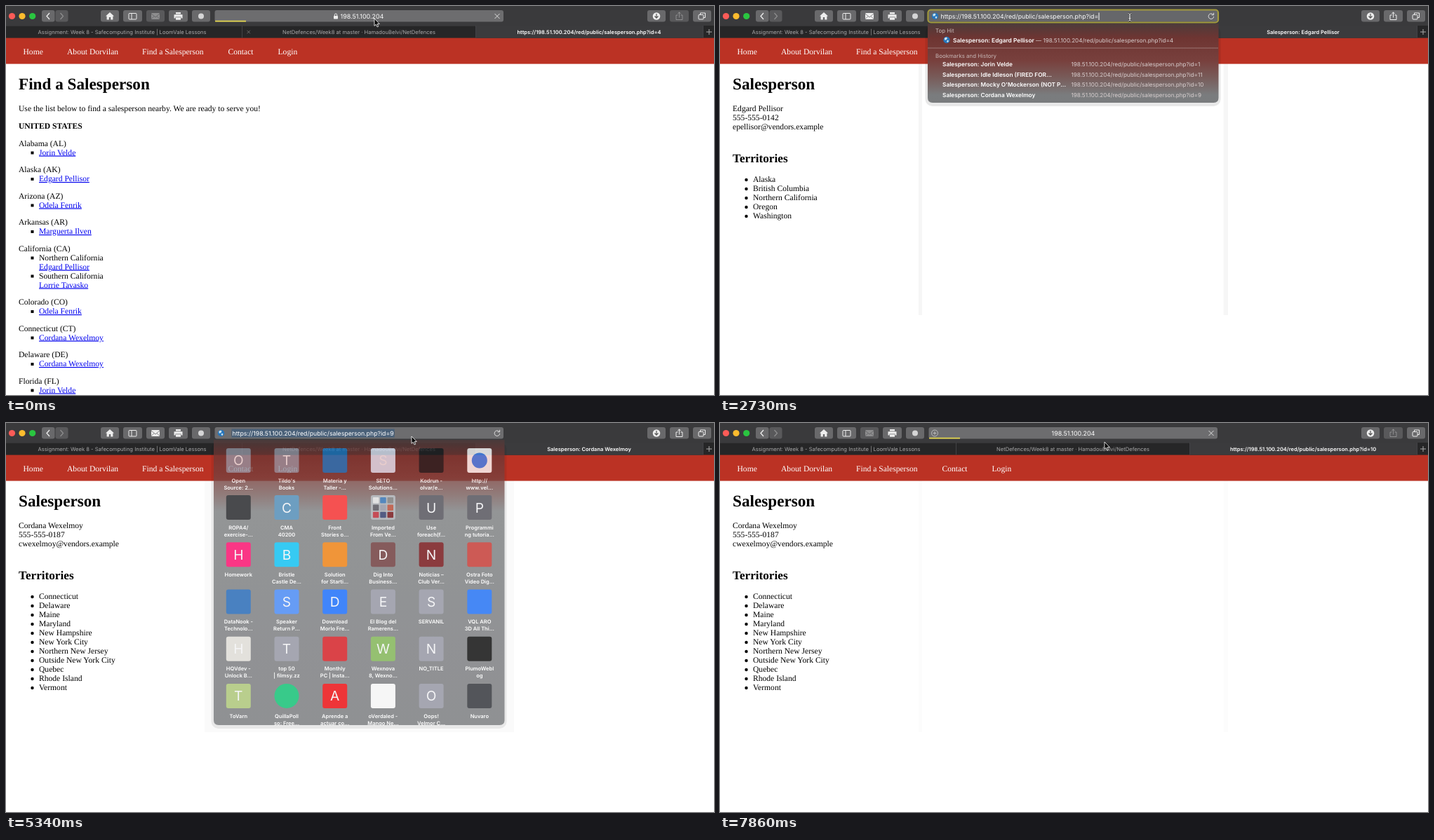
Animation of 1009x555 px, one loop 8 s. Source, as an HTML page:

```html
<!DOCTYPE html>
<html lang="en">
<head>
<meta charset="utf-8">
<title>Salesperson</title>
<style>
  html, body { margin: 0; width: 100%; height: 100%; overflow: hidden; background: #fff; }
  svg { display: block; width: 100vw; height: 100vh; text-rendering: geometricPrecision; font-family: Inter, sans-serif; }
  .serif { font-family: "Liberation Serif", serif; font-size: 11.6px; }
  text { white-space: pre; }
</style>
</head>
<body>
<svg id="stage" viewBox="0 0 1009 555"></svg>
<script>
const LOOP = 8000;
const HOST = '198.51.100.204';
const URL_SIZE = 8.75;
const stage = document.getElementById('stage');

const people = [
  { name: 'Edgard Pellisor', phone: '555-555-0142', mail: 'epellisor@vendors.example',
    areas: 'Alaska|British Columbia|Northern California|Oregon|Washington' },
  { name: 'Cordana Wexelmoy', phone: '555-555-0187', mail: 'cwexelmoy@vendors.example',
    areas: 'Connecticut|Delaware|Maine|Maryland|New Hampshire|New York City|Northern New Jersey|' +
      'Outside New York City|Quebec|Rhode Island|Vermont' }
];

// "*" marks a bullet, "_" a link
const directory = `Alabama (AL)|*_Jorin Velde
Alaska (AK)|*_Edgard Pellisor
Arizona (AZ)|*_Odela Fenrik
Arkansas (AR)|*_Marguerta Ilven
California (CA)|*Northern California|_Edgard Pellisor|*Southern California|_Lorrie Tavasko
Colorado (CO)|*_Odela Fenrik
Connecticut (CT)|*_Cordana Wexelmoy
Delaware (DE)|*_Cordana Wexelmoy
Florida (FL)|*_Jorin Velde`.split('\n');

// letter, colour, two label lines; "o" is a dot on the tile, "@" a round tile, "#" a folder
const tiles = `O,#9092a0,Open,Source: 2...
T,#9092a0,Tildo's,Books
,#1b76bf,Materia y,Taller -...
S,#dae4f5,SETO,Solutions...
,#1d1f22,Kodrun -,olvar/e...
o,#ffffff,http://,www.vel...
,#1d1f22,ROPA4/,exercise-...
C,#4a88b4,CMA,40200
,#f52828,Front,Stories o...
#,#a6a9af,Imported,From Ve...
U,#4d4c55,Use,foreach(f...
P,#4d4c55,Programmi,ng tutoria...
H,#fb0668,Homework,
B,#06bff2,Bristle,Castle De...
,#ee7d0a,Solution,for Starti...
D,#693435,Dig Into,Business...
N,#700c10,Noticias –,Club Ver...
,#c2332c,Ostra Foto,Video Dig...
,#1d64b4,DataNook -,Technolo...
S,#4285f4,Speaker,Return P...
D,#1268fb,Download,Morlo Fre...
E,#9092a0,El Blog del,Ramerens...
S,#9092a0,SERVANIL,
,#1a6cf5,VQL ARO,3D All Thi...
H,#dedcd5,HQVdev -,Unlock B...
T,#9092a0,top 50,| filmsy.zz
,#d3161c,Monthly,PC | Insta...
W,#7cb250,Wexnova,8&#44; Wexno...
N,#9092a0,NO_TITLE,
,#050505,PlumoWebl,og
T,#a9c473,ToVarn,
@,#08bf6f,QuillaPoll,so: Free...
A,#ec0408,Aprende a,actuar co...
,#f6f6f6,oVerdaled -,Mango Ne...
O,#9092a0,Oops!,Velmor C...
,#2a2d33,Nuvaro,`.split('\n').map(row => row.split(','));

const visited = {
  1: 'Jorin Velde', 4: people[0].name, 9: people[1].name,
  10: "Mocky O'Mockerson (NOT P...", 11: 'Idle Idleson (FIRED FOR...'
};

// For each typed id: top hit first, then history
const matches = { '': [4, 1, 11, 10, 9], 9: [9], 1: [1, 11, 10], 10: [10] };

// Each step changes only the named parts of the state before it
let state = {
  at: 0, page: -1, id: '4', title: 'url', load: 342, lock: true, hint: 0, mouse: [525, 18], beam: false,
  panel: '', alpha: 1, edit: false, focus: false, selected: false, caret: false, ghost: ''
};
const idle = { panel: '', alpha: 1, edit: false, focus: false, caret: false, beam: false };
const states = [
  {},
  { at: 210, load: 545, mouse: [570, 27] },
  { at: 480, page: 0, title: 'name', load: 640 },
  { at: 630, load: 0 },
  { at: 900, mouse: [583, 19] },
  { at: 1080, mouse: [591, 12] },
  { at: 1260, panel: 'tiles', alpha: .8, edit: true, selected: true, mouse: [591, 11], ghost: '#fafafa' },
  { at: 1440, alpha: 1, focus: true, ghost: '#f6f6f6' },
  { at: 1680, beam: true, mouse: [587, 14] },
  { at: 1860, selected: false, caret: true, mouse: [584, 16] },
  { at: 2220, id: '' },
  { at: 2370, caret: false },
  { at: 2730, caret: true, panel: 'matches' },
  { at: 2910, id: '9' },
  { at: 3120, beam: false, mouse: [556, 17] },
  { at: 3330, alpha: .5, mouse: [535, 20] },
  { at: 3540, ...idle, lock: false, mouse: [519, 22] },
  { at: 3750, title: 'url', load: 342, hint: .4, mouse: [513, 23] },
  { at: 3960, page: 1, load: 640, hint: 0 },
  { at: 4140, title: 'name', load: 0, lock: true },
  { at: 4410, mouse: [520, 25] },
  { at: 4590, mouse: [536, 26] },
  { at: 4770, mouse: [555, 25] },
  { at: 4980, mouse: [570, 22] },
  { at: 5160, mouse: [577, 20] },
  { at: 5340, panel: 'tiles', alpha: .8, edit: true, selected: true, mouse: [578, 19], ghost: '#fafafa' },
  { at: 5520, alpha: 1, focus: true, mouse: [579, 15], ghost: '#fbfbfb' },
  { at: 5730, beam: true, mouse: [579, 12] },
  { at: 5940, selected: false, caret: true },
  { at: 6480, id: '' },
  { at: 6660, panel: 'matches' },
  { at: 6870, id: '1' },
  { at: 7080, id: '10' },
  { at: 7260, alpha: .5, beam: false, mouse: [573, 18] },
  { at: 7470, ...idle, lock: false, ghost: '#fcfcfc', mouse: [560, 23] },
  { at: 7680, title: 'url', load: 318, hint: .9, mouse: [552, 25] },
  { at: 7860, load: 342, mouse: [548, 27] }
].map(change => state = { ...state, ...change });

const pen = document.createElement('canvas').getContext('2d');
const widthOf = s => (pen.font = `${URL_SIZE}px Inter, sans-serif`, pen.measureText(s).width);
const address = id => `${HOST}/red/public/salesperson.php?id=${id}`;

const text = (x, y, s, fill = '#fff', size = '', more = '') =>
  `<text x="${x}" y="${y}" fill="${fill}" ${size && `style="font-size:${size}px"`} ${more}>${s}</text>`;
const rect = (x, y, w, h, fill, r = 0, more = '') =>
  `<rect x="${x}" y="${y}" width="${w}" height="${h}" fill="${fill}" rx="${r}" ${more}/>`;
const dot = (x, y, r, fill) => `<circle cx="${x}" cy="${y}" r="${r}" fill="${fill}"/>`;
const fillPath = (d, fill = '#eee') => `<path d="${d}" fill="${fill}"/>`;
const line = (d, color = '#eee', w = 1, more = '') =>
  `<path d="${d}" fill="none" stroke="${color}" stroke-width="${w}" ${more}/>`;
const group = (more, s) => `<g ${more}>${s}</g>`;
const middle = 'text-anchor="middle"';
const bold = 'font-weight="700"';

function listPage() {
  let y = 199.5;
  let out = text(18, 118.6, 'Find a Salesperson', '#000', 23.2, bold) +
    text(18, 150.3, 'Use the list below to find a salesperson nearby. We are ready to serve you!', '#000') +
    text(18, 174.8, 'UNITED STATES', '#000', '', bold);
  for (const entry of directory) {
    entry.split('|').forEach((row, i) => {
      const link = row.includes('_');
      if (row[0] === '*') out += rect(35.5, y - 5, 4, 4, '#000');
      out += text(i ? 47 : 18, y, row.replace(/[*_]/g, ''), link ? '#0000ee' : '#000', '',
        link ? 'text-decoration="underline"' : '');
      y += 13;
    });
    y += 11.5;
  }
  return out;
}

function personPage({ name, phone, mail, areas }) {
  return text(18, 118.6, 'Salesperson', '#000', 23.2, bold) +
    [name, phone, mail].map((s, i) => text(18, 150.3 + 13 * i, s, '#000')).join('') +
    text(18, 222.5, 'Territories', '#000', 17.2, bold) +
    areas.split('|').map((s, i) => dot(37.5, 248 + 13 * i, 2.2, '#000') + text(47, 251.2 + 13 * i, s, '#000')).join('');
}

function page(s) {
  const nav = [[24.5, 'Home'], [87, 'About Dorvilan'], [194, 'Find a Salesperson'], [316.5, 'Contact'], [387.5, 'Login']];
  const ghost = s.ghost && rect(283, 82, 441, 359, s.ghost) +
    (s.panel === 'tiles' ? '' : rect(288, 82, 429.5, 360, '#fff'));
  return ghost + group('class="serif"', rect(0, 45, 1009, 37.6, '#bb3224') +
    nav.map(([x, label]) => text(x, 68.7, label)).join('') +
    (s.page < 0 ? listPage() : personPage(people[s.page])));
}

function tabs(s) {
  const title = s.title === 'url' ? 'https://' + address(s.id) : 'Salesperson: ' + people[s.page].name;
  return rect(0, 28, 1009, 17.6, '#262627') + rect(670, 28, 323, 17.6, '#3b3b3d') +
    line('M0 28H670M336.5 28v17.5M669.5 28v17.5M993.5 28v17.5', '#4b4b4d', .8) +
    text(165.5, 39.5, 'Assignment: Week 8 - Safecomputing Institute | LoomVale Lessons', '#a9a9aa', 7.6, middle) +
    text(503, 39.5, 'NetDefences/Week8 at master · HamadouBelvi/NetDefences', '#a9a9aa', 7.6, middle) +
    text(831, 39.5, title, '#fff', 7.5, middle + ' font-weight="600"') +
    (s.page < 0 ? line('M343.5 34.8l4.5 4.5m0-4.5l-4.5 4.5', '#777', .8) : '') +
    line('M998 37h8m-4-4v8', '#aaa');
}

function button(x, w, icon, dim) {
  return rect(x, 6, w, 16.5, dim ? '#59595b' : '#69696b', 3) + group(dim ? 'opacity=".35"' : '', icon);
}

function toolbar(s) {
  const busy = s.load > 0;
  return rect(0, 0, 1009, 28, '#3a3a3c') +
    dot(8.5, 14.5, 4.6, '#fc5b57') + dot(23, 14.5, 4.6, '#fdbc2e') + dot(37.7, 14.5, 4.6, '#2ac540') +
    button(51, 18.5, line('M62 10l-4 4.5 4 4.5', '#eee', 1.3)) +
    button(70.5, 18, line('M77.5 10l4 4.5-4 4.5', '#eee', 1.3), true) +
    button(135, 26, fillPath('M148 9l-6 5.5h1.6v5h3.2v-3.5h2.4v3.5h3.2v-5h1.6z')) +
    button(167, 27, rect(175, 10.5, 11, 8.5, 'none', 1, 'stroke="#eee"') + line('M179 10.5v8.5')) +
    button(200, 26, rect(207, 10, 12, 9, '#eee', 1) + line('M207 11l6 5 6-5M207 18.5l4-4M219 18.5l-4-4', '#69696b', .8), busy) +
    button(232, 27, fillPath('M242 9h7v2.5h-7zM239.5 12.2h12v5.3h-2v-2h-8v2h-2zM242 16.2h7v3.5h-7z')) +
    button(265, 26, dot(278, 14.5, 4, '#d5d5d6')) +
    button(914, 26, dot(927, 14.5, 5.3, '#eee') + line('M927 11v6m-2.5-2.5l2.5 2.6 2.5-2.6', '#555', 1.2)) +
    button(946, 27, line('M957.5 13h-2.5v6.5h9v-6.5h-2.5M959.5 16.5v-7.5m-2.3 2.2l2.3-2.3 2.3 2.3'), busy) +
    button(979, 26, rect(987, 12.5, 7, 6.5, 'none', 1, 'stroke="#eee"') + line('M989.5 12.5v-2.5h7v6.5h-2.5'));
}

function globe(x, y) {
  return dot(x, y, 4.7, '#2576bd') + fillPath(`M${x - 3} ${y - 3}l3-1 1 2-2 2-2 0zM${x + 1} ${y}l2 1-1 2.5-2-1z`, '#cde3ec');
}

function addressBar(s) {
  let out = rect(297.5, 6, 411.5, 16.5, s.focus ? '#66676a' : '#6d6d6f', 3);
  if (s.focus) out += rect(296.5, 5.5, 413.5, 18, 'none', 4, 'stroke="#a39a3d" stroke-width="2.2"');
  if (s.edit) {
    const x = s.focus ? 314.5 : 322.5;
    const value = 'https://' + address(s.id);
    const w = widthOf(value);
    if (s.selected) out += rect(x - 1, 8.5, w + 2, 12, '#4a6179');
    out += globe(306.5, 14.5) + text(x, 17.8, value, '#fff', URL_SIZE);
    if (s.caret) out += rect(x + w + .3, 9.5, 1, 10.5, '#fff');
  } else {
    out += text(s.lock ? 507.5 : 503.5, 17.8, HOST, '#fff', URL_SIZE + .2, middle);
    if (s.lock) out += rect(467, 14, 6, 4.5, '#eee', .7) + line('M468.3 14.5v-1.8a1.7 1.7 0 0 1 3.4 0v1.8');
    if (s.hint) out += group(`opacity="${s.hint}"`, line('M301.5 14.5a4.5 4.5 0 1 0 9 0a4.5 4.5 0 1 0-9 0M303.5 14.5h5m-2.5-2.5v5', '#ccc', .9));
  }
  if (s.load) out += rect(298, 20.8, s.load - 298, 1.7, '#e6d84c');
  return out + (s.load
    ? line('M696.5 11l7 7m0-7l-7 7', '#ddd')
    : line('M703 12.5a3.8 3.8 0 1 0 .7 2.5M703.6 9.8v3h-3', '#ddd'));
}

function tile([mark, color, first, second], i) {
  const x = 331.3 + 68.7 * (i % 6), y = 54.4 + 67.2 * Math.floor(i / 6);
  let out = mark === '@' ? dot(x, y, 17.5, color) : rect(x - 17.5, y - 17.5, 35, 35, color, 3);
  if (mark === 'o') out += dot(x, y, 11, '#4285f4');
  else if (mark === '#') {
    const colors = ['#ddd', '#2b6cb0', '#777', '#4d4c55', '#9092a0', '#b5452f', '#b8232f', '#2a3566', '#700c10'];
    out += colors.map((c, k) => rect(x - 14.5 + 10.3 * (k % 3), y - 14.5 + 10.3 * Math.floor(k / 3), 8.5, 8.5, c, 1)).join('');
  } else if (/[A-Z]/.test(mark)) out += text(x, y + 7, mark, '#f4f4f6', 19.2, middle + ' font-weight="400"');
  return out + [first, second].map((label, k) =>
    text(x, y + 31.2 + 9.9 * k, label, '#fff', 7.5, middle + ' font-weight="600"')).join('');
}

function matchList(id) {
  const [top, ...rest] = matches[id];
  const name = visited[top];
  const url = (x, y, n) => text(x, y, address(n), '#d9cfcf', 8.1);
  return text(307, 38, 'Top Hit', '#c9b9b8', 7.9) + globe(323, 48.5) +
    `<text x="332" y="51.7" fill="#fff" font-size="8.4" font-weight="600">Salesperson: ${name}` +
    `<tspan fill="#d9cfcf" font-size="8.1" font-weight="400"> — ${address(top)}</tspan></text>` +
    (rest.length ? line('M296 60H710', '#a58381', .8) + text(307, 73.5, 'Bookmarks and History', '#c9b9b8', 7.9) : '') +
    rest.map((n, i) => text(317, 86.4 + 14.5 * i, 'Salesperson: ' + visited[n], '#fff', 8.3, 'font-weight="600"') +
      url(500.5, 86.4 + 14.5 * i, n)).join('');
}

function panel(s) {
  if (!s.panel) return '';
  const grid = s.panel === 'tiles';
  const bottom = grid ? 432 : 60 + (matches[s.id].length > 1 ? 20 + 14.5 * (matches[s.id].length - 1) : 0);
  const shape = `M296 25h414.5V${bottom - 7}q0 7-7 7H303q-7 0-7-7z`;
  const stops = [[0, '#4d3b3b'], [.05, '#6e3532'], [.13, '#78403d'], [.19, '#785c5a'], [.25, '#7a7c7e'], [1, '#75777a']];
  return group(`opacity="${s.alpha}" ${s.alpha < 1 ? 'transform="translate(0 -1)"' : ''}`,
    `<defs><clipPath id="edge"><path d="${shape}"/></clipPath>` +
    '<linearGradient id="glass" gradientUnits="userSpaceOnUse" x1="0" y1="25" x2="0" y2="432">' +
    stops.map(([o, c]) => `<stop offset="${o}" stop-color="${c}"/>`).join('') + '</linearGradient></defs>' +
    rect(292.5, 28, 421, bottom - 23, '#000', 10, 'opacity=".09"') +
    fillPath(shape, 'url(#glass)') +
    group('clip-path="url(#edge)"', grid ? tiles.map(tile).join('') : matchList(s.id)));
}

function pointer({ mouse: [x, y], beam }) {
  const bar = 'M-2.5 -5.5q2.5 0 2.5 2v7q0 2-2.5 2M2.5 -5.5q-2.5 0-2.5 2v7q0 2 2.5 2M-1.5 1.5h3';
  return group(`transform="translate(${x} ${y})"`, beam
    ? line(bar, '#222', 2.2) + line(bar, '#eee', .9)
    : '<path d="M0 0v10.3l2.4-2.1 1.6 3.7 1.7-.7-1.6-3.6h3.2z" fill="#000" stroke="#eee" stroke-width=".9"/>');
}

let shown;
function frame(now) {
  const t = now % LOOP;
  const current = states.findLast(s => s.at <= t);
  if (current !== shown) {
    shown = current;
    stage.innerHTML = [page, tabs, toolbar, panel, addressBar, pointer].map(part => part(current)).join('');
  }
  requestAnimationFrame(frame);
}
requestAnimationFrame(frame);
</script>
</body>
</html>
```
